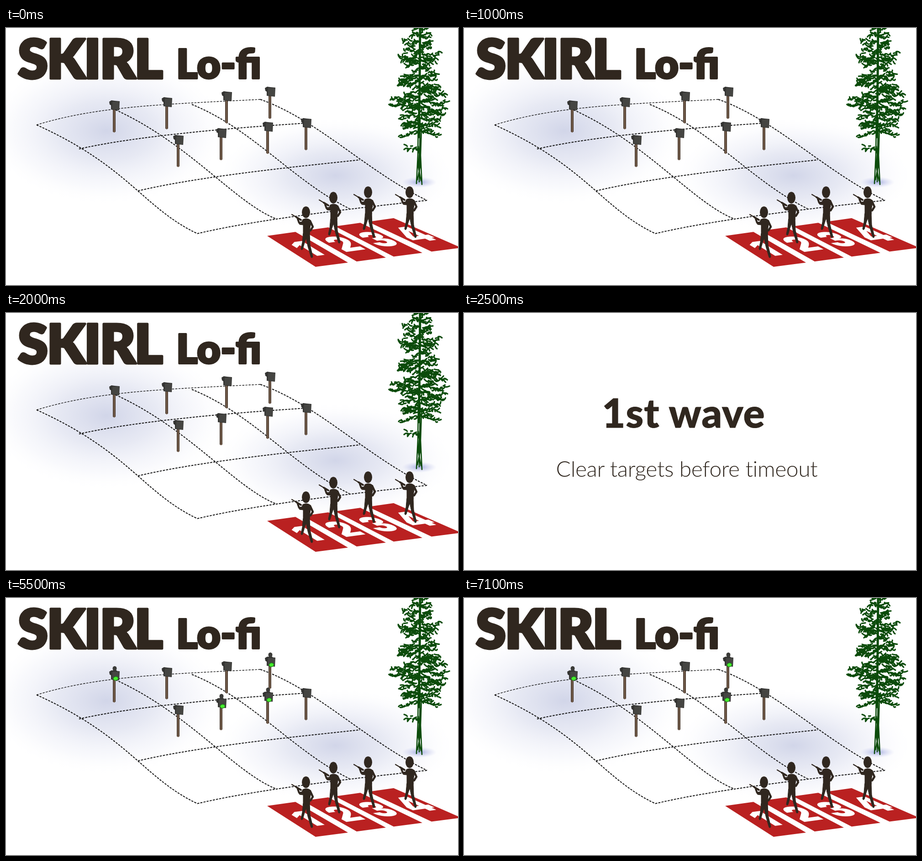
These frames come from a looping animation (990 by 565 pixels, 8 s). An HTML page:

```html
<!DOCTYPE html>
<html lang="en">
<head>
<meta charset="utf-8">
<title>Target range</title>
<style>
  html, body { margin: 0; width: 100%; height: 100%; overflow: hidden; background: #fff; }
  svg { display: block; width: 990px; height: 565px; }
  text { font-family: Lato, "Open Sans", sans-serif; fill: #30271f; }
  .title { font-weight: 900; stroke: #30271f; stroke-linejoin: round; }
  .digit { font: 900 100px Inter, Roboto, sans-serif; fill: #fff; text-anchor: middle; }
  .card text { text-anchor: middle; }
  .grid { fill: none; stroke: #151515; stroke-width: 2; stroke-dasharray: 4.5 2.5; }
  .tree { fill: none; stroke: #0b4b0a; stroke-linecap: round; }
</style>
</head>
<body>
<svg viewBox="0 0 990 565">
  <defs>
    <radialGradient id="haze">
      <stop offset="0" stop-color="#c6cbe3" stop-opacity=".8"/>
      <stop offset=".4" stop-color="#d3d7ea" stop-opacity=".55"/>
      <stop offset=".75" stop-color="#e6e8f5" stop-opacity=".25"/>
      <stop offset="1" stop-color="#fff" stop-opacity="0"/>
    </radialGradient>
    <radialGradient id="shade">
      <stop offset="0" stop-color="#9ba4dc" stop-opacity=".9"/>
      <stop offset="1" stop-color="#c8cdee" stop-opacity="0"/>
    </radialGradient>
    <radialGradient id="glow">
      <stop offset="0" stop-color="#5dff3c"/>
      <stop offset=".45" stop-color="#3fdf27"/>
      <stop offset="1" stop-color="#3fdf27" stop-opacity="0"/>
    </radialGradient>
    <linearGradient id="wood">
      <stop offset="0" stop-color="#3b2d24"/>
      <stop offset=".5" stop-color="#806854"/>
      <stop offset="1" stop-color="#3f3026"/>
    </linearGradient>
    <g id="post">
      <path d="M-3 8H3V58L0 60-3 58Z" fill="url(#wood)"/>
      <path d="M-11-8L-6-11 1-10 12-9 11 11-7 9-7 0-10-2Z" fill="#343432"/>
      <path d="M-4-8L11-8 10 10-5 8Z" fill="#454542"/>
    </g>
    <g id="head" fill="#3b3b38">
      <ellipse cx="1" cy="-15" rx="4.5" ry="5.3"/>
      <path d="M-5-8Q-4-12 1-12T7-8Z"/>
    </g>
    <g id="lamp">
      <ellipse cx="3.3" cy="7" rx="6" ry="4.8" fill="#1d7d18" transform="rotate(-9 3 7)"/>
      <ellipse cx="3.3" cy="7" rx="4.8" ry="3.6" fill="#46ed2e" transform="rotate(-9 3 7)"/>
    </g>
    <circle id="flash" cx="3.3" cy="7" r="11" fill="url(#glow)"/>
    <g id="player" fill="#30271f" stroke="#30271f" stroke-linecap="round" stroke-linejoin="round">
      <ellipse rx="9" ry="12.8" stroke="none"/>
      <path d="M-7 16Q0 12 8 16L11 23 9 34 8 49-6 52-6 28-14 27-17 22-9 21Z" stroke-width="1"/>
      <path d="M9 19L15 32 10 40" fill="none" stroke-width="4.500"/>
      <path d="M-31 5L-11 17" fill="none" stroke-width="2.200"/>
      <path d="M-21 11L-11 17M-18 15L-15 23" fill="none" stroke-width="4"/>
      <path d="M-6 47L3 49-3 67-7 81Q-10 85-11 80L-8 66Z" stroke-width="1"/>
      <path d="M-1 49L8 46 9 72 15 97Q14 102 11 99L4 75Z" stroke-width="1"/>
    </g>
  </defs>

  <rect width="990" height="565" fill="#fff"/>
  <ellipse cx="220" cy="226" rx="270" ry="165" fill="url(#haze)"/>
  <ellipse cx="722" cy="324" rx="265" ry="128" fill="url(#haze)"/>
  <ellipse cx="905" cy="339" rx="38" ry="12" fill="url(#shade)"/>

  <g class="grid">
    <path d="M67 213C200 172 340 168 557 157" stroke-width="1.4"/>
    <path d="M160 266C250 245 420 224 660 209"/>
    <path d="M289 358C400 332 560 312 775 290"/>
    <path d="M419 452C520 428 680 405 922 379"/>
    <path d="M67 213C270 305 300 395 419 452"/>
    <path d="M240 180C400 253 500 382 590 419"/>
    <path d="M407 168C540 222 630 337 752 397"/>
    <path d="M557 157C680 200 790 315 922 379"/>
  </g>

  <g id="tree" class="tree"></g>
  <g id="mats"></g>
  <g id="range"></g>
  <path id="shot" d="M684 381L475 217" stroke="#e02020" stroke-width="2"/>
  <g id="players"></g>

  <text class="title" x="26" y="111" font-size="119" letter-spacing="-2.5" stroke-width="5">SKIRL</text>
  <text class="title" x="373" y="111" font-size="89" stroke-width="4">Lo-fi</text>

  <g id="card" class="card">
    <rect width="990" height="565" fill="#fff"/>
    <text x="481" y="252" font-size="88" font-weight="800" letter-spacing="1" stroke="#30271f" stroke-width="1">1st wave</text>
    <text x="488" y="360" font-size="48" font-weight="300" letter-spacing="-.35">Clear targets before timeout</text>
  </g>
</svg>
<script>
const LOOP = 8000;
const $ = id => document.getElementById(id);
const parts = [];

function add(parent, tag, attrs) {
  const el = document.createElementNS("http://www.w3.org/2000/svg", tag);
  for (const key in attrs) el.setAttribute(key, attrs[key]);
  return parent.appendChild(el);
}
const use = (parent, id, x, y) => add(parent, "use", { href: "#" + id, x, y });
const during = (el, ...spans) => parts.push({ el, spans });

// Targets: position, pop-up span and lamp span
const blink = [[500, 1000], [1500, 2000]];
[
  [237, 170, [5000, LOOP]],
  [352, 163],
  [483, 150],
  [578, 140, [5000, LOOP]],
  [377, 246],
  [471, 231, [5500, 6700], [5500, 6900]],
  [573, 217, [5500, LOOP]],
  [657, 209]
].forEach(([x, y, up, lit = up]) => {
  const range = $("range");
  if (up) during(use(range, "head", x, y), up);
  use(range, "post", x, y);
  if (lit) during(use(range, "lamp", x, y), lit);
  during(use(range, "flash", x, y), ...blink);
});

during($("shot"), [6500, 7100]);
during($("card"), [2500, 4500]);

[[793, 361], [884, 361], [717, 373], [657, 405]]
  .forEach(([x, y]) => use($("players"), "player", x, y));

// Numbered lanes: left and right ends on the far and near edge
const far = x => [x, 457 - 39 * (x - 572) / 277];
const near = x => [x, 525 - 42 * (x - 678) / 319];
[[572, 634, 678, 749], [650, 706, 768, 832], [721, 776, 849, 912], [793, 849, 932, 997]]
  .forEach(([a, b, c, d], i) => {
    const quad = [far(a), far(b), near(d), near(c)];
    add($("mats"), "polygon", { points: quad.join(" "), fill: "#ba2121" });
    const mid = k => quad.reduce((sum, p) => sum + p[k], 0) / 4;
    const across = k => (quad[1][k] + quad[2][k] - quad[0][k] - quad[3][k]) / 2 * .0125;
    const down = k => (quad[2][k] + quad[3][k] - quad[0][k] - quad[1][k]) / 2 * .0062;
    const matrix = [across(0), across(1), down(0), down(1), mid(0), mid(1) - 1];
    add($("mats"), "text", { class: "digit", y: 36, transform: `matrix(${matrix})` })
      .textContent = i + 1;
  });

// Conifer grown from a seeded generator
let seed = 41;
const rnd = (lo, hi) => {
  seed = (seed * 16807) % 2147483647;
  return lo + (hi - lo) * seed / 2147483647;
};
const fix = n => n.toFixed(1);
const reach = y => y < 170 ? 14 + 54 * Math.sqrt(y / 170) : 68 - (y - 170) * .4;

// A bough is a row of twigs at loose angles that sags and lifts along its length
function bough(y, side, length) {
  const sag = rnd(-3, 10);
  const wave = rnd(0, 6);
  let d = "";
  for (let x = 0; x < length; x += rnd(2, 4.5)) {
    const top = y + sag * x / length + 3 * Math.sin(x / 7 + wave) + rnd(-4, 4);
    d += `M${fix(906 + side * x)} ${fix(top)}` +
      `q${fix(side * rnd(1, 6))} ${fix(rnd(-4, 5))} ${fix(side * rnd(3, 10))} ${fix(rnd(-6, 7))}`;
  }
  return d;
}

let foliage = "";
for (let y = 2; y < 236; y += 9) {
  for (const side of [-1, 1]) foliage += bough(y + rnd(-4, 4), side, reach(y) * rnd(.45, .95));
}
foliage += bough(262, -1, 28);
add($("tree"), "path", { d: foliage, "stroke-width": 3.1 });
add($("tree"), "path", { d: "M907 0L906 120 904 240", "stroke-width": 5 });
add($("tree"), "path", {
  d: "M903 210L902 280 899 342M907 200L906 290 905 338M910 220L908 280 911 344M903 260L908 300 901 334M907 255L903 305 909 336",
  "stroke-width": 2.6
});

function draw(now) {
  const t = now % LOOP;
  for (const { el, spans } of parts) {
    const on = spans.some(([from, to]) => t >= from && t < to);
    el.style.visibility = on ? "visible" : "hidden";
  }
}

const start = performance.now();
function tick() {
  draw(performance.now() - start);
  requestAnimationFrame(tick);
}
tick();
</script>
</body>
</html>
```
